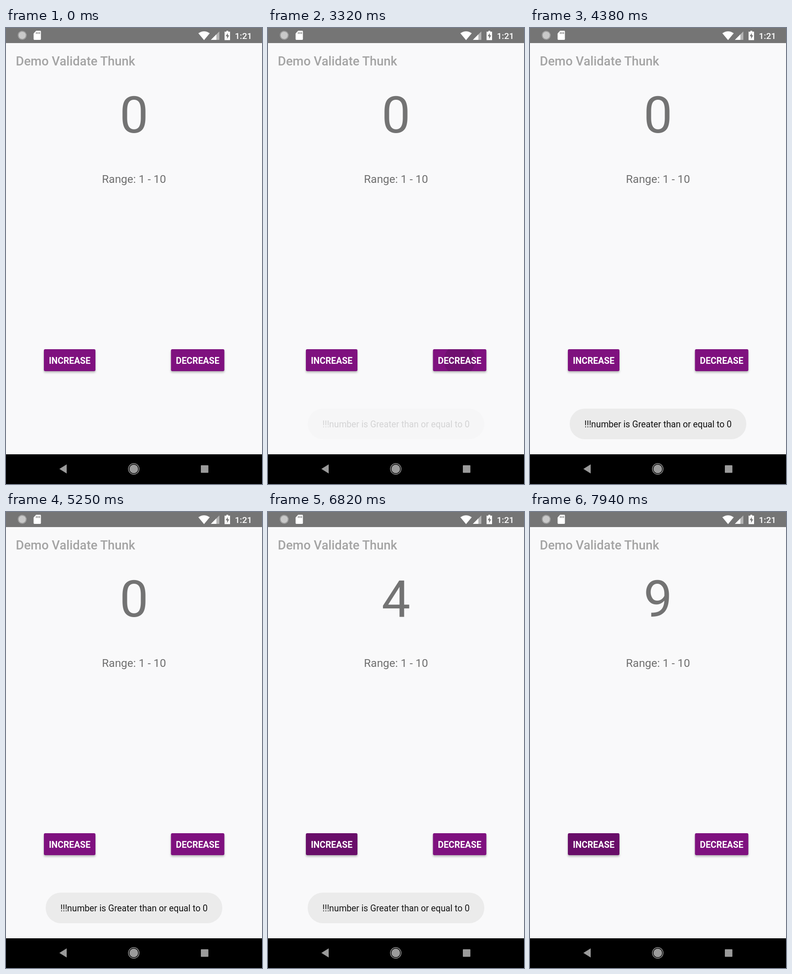
These frames come from a looping animation (561 by 998 pixels, 7.99 s). An HTML page:

```html
<!DOCTYPE html>
<html lang="en">
<head>
<meta charset="utf-8">
<title>Counter</title>
<style>
  html, body { margin: 0; width: 100%; height: 100%; overflow: hidden; background: #f9f9fa; }
  svg { display: block; font-family: Roboto, sans-serif; }
  .mid { text-anchor: middle; }
  .label { font-size: 19.4px; font-weight: 700; fill: #fff; }
  .button { fill: #7f117f; filter: drop-shadow(0 3px 2px rgba(0, 0, 0, .27)); }
</style>
</head>
<body>
<svg width="561" height="998" viewBox="0 0 561 998">
  <defs>
    <clipPath id="incClip"><rect x="83" y="703" width="113" height="48" rx="3"/></clipPath>
    <clipPath id="decClip"><rect x="361.5" y="703" width="117" height="48" rx="3"/></clipPath>
  </defs>

  <!-- status bar -->
  <rect width="561" height="33" fill="#757575"/>
  <circle cx="35.5" cy="16" r="8" fill="#c9c9c9"/>
  <circle cx="35.5" cy="16" r="9" fill="none" stroke="#c9c9c9" stroke-width="1.5" stroke-dasharray="1.5 1.3"/>
  <path d="M66 6H75Q76.500 6 76.500 8V24Q76.500 26 75 26H62Q60.500 26 60.500 24V12Z" fill="#fff"/>
  <path d="M66.500 9v4M70 9v4M73.500 9v4" stroke="#757575" stroke-width="1.600"/>
  <path d="M421.500 11.500Q434 3 446.500 11.500L434 26.500Z" fill="#fff"/>
  <path d="M467.500 7.500V26H449Z" fill="#b5b5b5"/>
  <path d="M461 14V26H449Z" fill="#fff"/>
  <path d="M483 6h4v2h4v18.500h-12V8h4Z" fill="#fff"/>
  <path d="M486 11v5h3l-4.500 8v-6h-3Z" fill="#757575"/>
  <text x="501.500" y="24" font-size="19.1" font-weight="500" fill="#fff">1:21</text>

  <!-- page -->
  <text x="21.500" y="82" font-size="27.4" font-weight="500" fill="#a4a4a4">Demo Validate Thunk</text>
  <text id="count" class="mid" x="280.500" y="229" font-size="112" fill="#737373">0</text>
  <text class="mid" x="280.500" y="339" font-size="24.4" fill="#6f6f6f">Range: 1 - 10</text>

  <rect class="button" x="83" y="703" width="113" height="48" rx="3"/>
  <g id="inc" clip-path="url(#incClip)"></g>
  <text class="mid label" x="139.500" y="734.500">INCREASE</text>
  <rect class="button" x="361.500" y="703" width="117" height="48" rx="3"/>
  <g id="dec" clip-path="url(#decClip)"></g>
  <text class="mid label" x="420" y="734.500">DECREASE</text>

  <g id="toast" opacity="0">
    <rect x="87" y="833" width="387" height="67" rx="33" fill="#ebebeb"/>
    <text class="mid" x="280.500" y="874" font-size="19.3" fill="#111">!!!number is Greater than or equal to 0</text>
  </g>

  <!-- navigation bar -->
  <rect y="933" width="561" height="65"/>
  <g fill="#9b9b9b">
    <path d="M117 965L133 955V975Z"/>
    <circle cx="280" cy="965" r="9.500"/>
    <circle cx="280" cy="965" r="11.700" fill="none" stroke="#9b9b9b" stroke-width="1.500"/>
    <rect x="427" y="957" width="16.500" height="16.500" rx="1"/>
  </g>
</svg>
<script>
const LOOP = 7990, FADE = 500;
const TOAST_IN = 3280, TOAST_OUT = 6740, RESHOWN = [4360, 4670];
const FIRST_UP = 5980, UP_GAP = 225, PRESS = 60;
const $ = id => document.getElementById(id);
const clamp = v => Math.max(0, Math.min(1, v));

function addRipple(group, x, start) {
  const circle = document.createElementNS("http://www.w3.org/2000/svg", "circle");
  circle.setAttribute("cx", x);
  circle.setAttribute("cy", 727);
  $(group).append(circle);
  return { circle, start };
}

const ripples = [
  ...[3250, ...RESHOWN].map(t => addRipple("dec", 420, t)),
  ...Array.from({ length: 9 }, (_, i) => addRipple("inc", 139.5, FIRST_UP + i * UP_GAP))
];

function toastAlpha(t) {
  const enter = 1 - (1 - clamp((t - TOAST_IN) / FADE)) ** 2;
  const leave = 1 - clamp((t - TOAST_OUT) / FADE) ** 2;
  // each new toast cross-fades over the one before
  const dips = RESHOWN.map(s => {
    const p = clamp((t - s) / FADE);
    return 1 - (p * (1 - p)) ** 2;
  });
  return dips.reduce((a, b) => a * b, enter * leave);
}

function draw(now) {
  const t = now % LOOP;
  const count = Math.floor((t - FIRST_UP - PRESS) / UP_GAP) + 1;
  $("count").textContent = Math.max(0, Math.min(9, count));
  $("toast").setAttribute("opacity", toastAlpha(t));
  for (const { circle, start } of ripples) {
    const age = t - start;
    const grow = 1 - (1 - clamp(age / 225)) ** 2;
    circle.setAttribute("r", 65 * grow);
    circle.setAttribute("opacity", 0.13 * clamp(age / 75) * clamp((500 - age) / 275));
  }
}

const begin = performance.now();
function tick() {
  draw(performance.now() - begin);
  requestAnimationFrame(tick);
}
tick();
</script>
</body>
</html>
```
